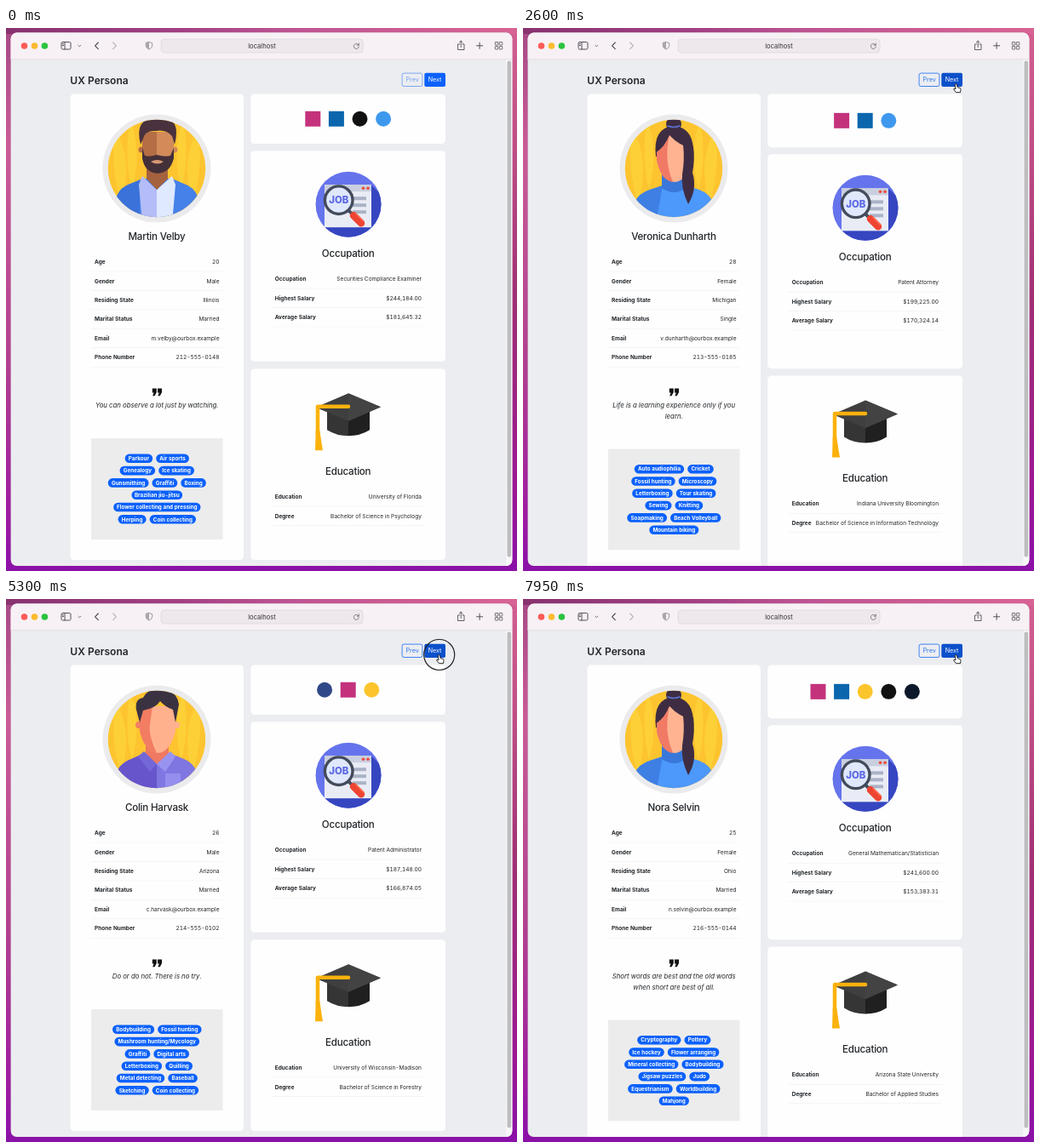
These frames come from a looping animation (600x638 px, 8 s). An HTML page:

```html
<!DOCTYPE html>
<html lang="en">
<head>
<meta charset="utf-8">
<title>UX Persona</title>
<style>
  html, body { margin: 0; width: 100%; height: 100%; overflow: hidden; }
  svg { display: block; width: 100vw; height: 100vh; }
  text { font-family: Inter, "Open Sans", sans-serif; font-variant-numeric: tabular-nums; white-space: pre; }
</style>
</head>
<body>
<svg viewBox="0 0 600 638">
  <defs>
    <linearGradient id="desk" x2="0" y2="1">
      <stop offset="0" stop-color="#a64a86"/>
      <stop offset=".22" stop-color="#c95c97"/>
      <stop offset=".6" stop-color="#b2428f"/>
      <stop offset=".9" stop-color="#9d1ca0"/>
      <stop offset="1" stop-color="#8a11a8"/>
    </linearGradient>
    <linearGradient id="side" x2="0" y2="1">
      <stop offset="0" stop-color="#d45f90"/>
      <stop offset=".25" stop-color="#bd4b84"/>
      <stop offset=".5" stop-color="#a02f74"/>
      <stop offset=".85" stop-color="#9c1793"/>
      <stop offset="1" stop-color="#8a11a8"/>
    </linearGradient>
    <linearGradient id="top">
      <stop offset="0" stop-color="#883270"/>
      <stop offset=".35" stop-color="#a34184"/>
      <stop offset=".55" stop-color="#bd5492"/>
      <stop offset="1" stop-color="#d86494"/>
    </linearGradient>
    <clipPath id="win"><rect x="5.6" y="5.6" width="588.8" height="626.4" rx="7"/></clipPath>
    <clipPath id="face"><circle cx="177" cy="165" r="57.2"/></clipPath>
    <clipPath id="disc"><circle cx="402" cy="63" r="38.5"/></clipPath>
  </defs>
  <rect width="600" height="638" fill="url(#desk)"/>
  <rect x="593" width="7" height="638" fill="url(#side)"/>
  <rect width="600" height="7" fill="url(#top)"/>
  <rect x="5.2" y="5.2" width="589.6" height="627.2" rx="7.4" fill="#7b2468" opacity=".25"/>
  <g clip-path="url(#win)">
    <rect x="5" y="5" width="590" height="628" fill="#ecedf1"/>
    <g id="page"></g>
    <g id="bar"></g>
  </g>
  <circle id="ring" cx="508.7" cy="65.5" r="18" fill="none" stroke="#222" stroke-width="1.2"/>
  <path id="hand" d="M507.2 66.2q1-1.2 2 0l1.1 3.5 2.9.9q1.1.5.8 1.8l-.6 3.3h-4.9l-2.9-3.7q.2-1.3 1.7-.7l.7.6z" fill="#fff" stroke="#111" stroke-width=".9" stroke-linejoin="round"/>
</svg>
<script>
const $ = id => document.getElementById(id);
const LOOP = 8000, INK = '#212529', BLUE = '#0b61fb';

const people = [
  { name: 'Martin Velby', info: ['20', 'Male', 'Illinois', 'Married', 'm.velby@ourbox.example', '212-555-0148'],
    face: 'beard', marks: 'pink navy black sky', height: 547.5,
    job: ['Securities Compliance Examiner', '$244,184.00', '$181,645.32'],
    study: ['University of Florida', 'Bachelor of Science in Psychology'],
    quote: ['You can observe a lot just by watching.'],
    tags: 'Parkour,Air sports|Genealogy,Ice skating|Gunsmithing,Graffiti,Boxing|Brazilian jiu-jitsu|Flower collecting and pressing|Herping,Coin collecting' },
  { name: 'Veronica Dunharth', info: ['28', 'Female', 'Michigan', 'Single', 'v.dunharth@ourbox.example', '213-555-0185'],
    face: 'woman', marks: 'pink navy sky', height: 560,
    job: ['Patent Attorney', '$199,225.00', '$170,324.14'],
    study: ['Indiana University Bloomington', 'Bachelor of Science in Information Technology'],
    quote: ['Life is a learning experience only if you', 'learn.'],
    tags: 'Auto audiophilia,Cricket|Fossil hunting,Microscopy|Letterboxing,Tour skating|Sewing,Knitting|Soapmaking,Beach Volleyball|Mountain biking' },
  { name: 'Colin Harvask', info: ['26', 'Male', 'Arizona', 'Married', 'c.harvask@ourbox.example', '214-555-0102'],
    face: 'man', marks: 'indigo pink gold', height: 547.5,
    job: ['Patent Administrator', '$187,148.00', '$166,874.05'],
    study: ['University of Wisconsin-Madison', 'Bachelor of Science in Forestry'],
    quote: ['Do or do not. There is no try.'],
    tags: 'Bodybuilding,Fossil hunting|Mushroom hunting/Mycology|Graffiti,Digital arts|Letterboxing,Quilling|Metal detecting,Baseball|Sketching,Coin collecting' },
  { name: 'Leopold Farnwick', info: ['27', 'Male', 'Connecticut', 'Single', 'l.farnwick@ourbox.example', '215-555-0146'],
    face: 'man', marks: 'indigo black', height: 536.5,
    job: ['Technical Systems Program Manager', '$199,548.00', '$153,384.09'],
    study: ['Clemson University', 'Bachelor of Mortuary Science'],
    quote: ['Courage is going from failure to failure', 'without losing enthusiasm.'],
    tags: 'Acting,Volleyball,Cabaret|Slacklining,Puzzles|Lockpicking,Geocaching|LARPing' },
  { name: 'Nora Selvin', info: ['25', 'Female', 'Ohio', 'Married', 'n.selvin@ourbox.example', '216-555-0144'],
    face: 'woman', marks: 'pink navy gold black ink', height: 560,
    job: ['General Mathematican/Statistician', '$241,600.00', '$153,383.31'],
    study: ['Arizona State University', 'Bachelor of Applied Studies'],
    quote: ['Short words are best and the old words', 'when short are best of all.'],
    tags: 'Cryptography,Pottery|Ice hockey,Flower arranging|Mineral collecting,Bodybuilding|Jigsaw puzzles,Judo|Equestrianism,Worldbuilding|Mahjong' }
];
// Pictures lag behind the text for a moment after the second switch
const lagging = { ...people[2], face: 'woman', marks: 'red black gold' };
const shows = [[0, people[0]], [1750, people[1]], [4050, lagging], [4250, people[2]], [5400, people[3]], [7700, people[4]]];
const clicks = [1550, 3850, 5200, 7500];

const rect = (x, y, w, h, fill, r = 0, more = '') =>
  `<rect x="${x}" y="${y}" width="${w}" height="${h}" rx="${r}" fill="${fill}" ${more}/>`;
const circle = (x, y, r, fill) => `<circle cx="${x}" cy="${y}" r="${r}" fill="${fill}"/>`;
const path = (d, fill) => `<path d="${d}" fill="${fill}"/>`;
const line = (d, color = '#55505a', w = 1) =>
  `<path d="${d}" fill="none" stroke="${color}" stroke-width="${w}" stroke-linecap="round" stroke-linejoin="round"/>`;
const move = (x, y, body) => `<g transform="translate(${x} ${y})">${body}</g>`;
// y is the middle of the capitals
const text = (x, y, s, size, { weight = 400, anchor = 'start', fill = INK, more = '' } = {}) =>
  `<text x="${x}" y="${y + size * .364}" font-size="${size}" font-weight="${weight}" text-anchor="${anchor}" fill="${fill}" ${more}>${s}</text>`;
const heading = (x, y, s) => text(x, y, s, 11.6, { weight: 500, anchor: 'middle', more: 'letter-spacing="-.23"' });

const pen = document.createElement('canvas').getContext('2d');
function badgeWidth(s) {
  pen.font = '700 63px Inter, "Open Sans", sans-serif';
  return pen.measureText(s).width / 10 + 8.4;
}

const table = (left, right, y, labels, values) => labels.map((label, i) => {
  const cy = y + i * 22.45;
  return text(left + 4, cy, label, 6.5, { weight: 700 }) +
    text(right - 4, cy, values[i], 6.55, { anchor: 'end' }) +
    rect(left, cy + 11, right - left, .6, '#f0f0f2');
}).join('');

const curtain = rect(113, 101, 128, 128, '#fdc42f') +
  path('M128 118Q150 155 135 206Q122 165 128 118zM146 108Q160 145 148 190Q138 150 146 108z', '#fdd037') +
  path('M226 118Q204 155 219 206Q232 165 226 118zM208 108Q194 145 206 190Q216 150 208 108z', '#fdd037');

const faces = {
  beard:
    path('M122 230L130 198Q134 187 146 183L160 177H195L209 183Q221 187 225 198L233 230z', '#4581e8') +
    path('M122 230L130 198Q134 187 146 183L157 179V230z', '#3b72da') +
    path('M160 174L177 190V230H160L156 184z', '#b4bdf8') + path('M195 174L177 190V230H195L199 184z', '#dfe9ff') +
    path('M165 160H190V177L177 190L165 177z', '#a5623e') +
    path('M160 122H197V151Q193 170 178 171Q163 170 160 151z', '#d28b59') +
    path('M160 122H177V171Q163 170 160 151z', '#b56d45') +
    circle(159, 143, 3.5, '#b56d45') + circle(198, 143, 3.5, '#d28b59') +
    path('M158 137Q154 121 159 113Q165 104 177 106Q192 103 198 113Q202 121 198 137L195 127Q188 119 176 121Q163 120 161 130z', '#49323d') +
    path('M160 141L163 150Q168 152 177 149Q187 152 193 150L197 141V153Q193 170 178 171Q163 170 160 153z', '#443039') +
    path('M170 157Q177 153 185 157Q178 162 170 157z', '#d99772'),
  man:
    path('M124 230L131 201Q136 192 147 188L163 181H192L209 188Q219 192 223 201L230 230z', '#8076e2') +
    path('M124 230L131 201Q136 192 147 188L163 181L177 195V230z', '#6655cb') +
    rect(187, 205, 18, 25, '#948eee', 1) +
    path('M164 164H191V182L177 194L164 182z', '#ef7961') +
    path('M162 179L177 194L169 203L155 185z', '#7467d8') + path('M193 179L177 194L187 203L199 185z', '#9993f0') +
    path('M157 126H199V155Q193 180 178 181Q162 178 157 155z', '#ffb18d') +
    path('M157 126H172L169 147Q167 160 177 181Q162 178 157 155z', '#f27d63') +
    circle(156, 148, 4, '#f27d63') + circle(200, 148, 4, '#ffb18d') +
    path('M157 145L153 130Q151 117 161 116Q168 103 184 106Q201 108 203 124L199 145L196 130Q187 127 181 120Q176 128 161 131z', '#3b3241'),
  woman:
    path('M127 230L131 205Q136 194 149 190L164 185H191L207 190Q220 195 223 206L229 230z', '#4d98fb') +
    path('M127 230L131 205Q136 194 149 190L164 185L156 230z', '#3e7fe4') +
    circle(177, 113, 9, '#3e2d42') +
    path('M156 151Q152 117 177 115Q202 117 200 151z', '#3e2d42') +
    path('M163 164H191V188Q178 198 163 188z', '#3978d9') +
    path('M164 164H190V174Q178 183 164 174z', '#ef755f') +
    path('M157 146Q167 139 172 126Q183 138 199 142V156Q192 180 178 181Q162 179 157 156z', '#ffb391') +
    path('M157 146Q167 139 172 126Q165 155 176 181Q162 179 157 156z', '#f17a64') +
    path('M188 137L200 139Q202 155 199 170Q205 189 194 207Q185 188 187 172Q190 155 188 137z', '#3e2d42') +
    line('M170 115Q177 118 184 115', '#5d73d7', 1.5)
};
const avatar = kind => circle(177, 165, 63.5, '#ebebed') +
  `<g clip-path="url(#face)">${curtain + faces[kind]}</g>`;

// Plain stand-ins: [colour, square?]
const marks = {
  pink: ['#c4327c', 1], navy: ['#0b66ad', 1], black: ['#111'], sky: ['#3e98ee'],
  red: ['#c5202b'], gold: ['#fcc52c'], indigo: ['#2f4888'], ink: ['#0c1829']
};
const markRow = (names, y) => names.split(' ').map((n, i, all) => {
  const x = 401.7 + (i - (all.length - 1) / 2) * 27.6, [color, square] = marks[n];
  return square ? rect(x - 9, y - 9, 18, 18, color) : circle(x, y, 9, color);
}).join('');

const jobIcon = `<g clip-path="url(#disc)">` + circle(402, 63, 39, '#6574ec') +
  path('M429 40L445 56V105H390L374 90z', '#3646c0') + '</g>' +
  rect(374, 40, 55, 50, '#e9ecf5') + rect(374, 40, 55, 8, '#c9cfde') +
  circle(419.5, 44, 1.8, '#ee4b3b') + circle(425, 44, 1.8, '#ee4b3b') +
  [54, 62, 70].map(y => rect(407, y, 16, 4, '#aab3c6')).join('') +
  line('M403 71L408 76', '#465062', 4) + line('M408 76L417 85', '#ef4432', 8.5) +
  line('M411 74L420 83', '#ff6b50', 1.5) +
  circle(390.7, 58, 18, '#434b5b') + circle(390.7, 58, 14.6, '#dfe8fc') +
  text(390.9, 58, 'JOB', 11.4, { weight: 800, anchor: 'middle', fill: '#5b68e2' });

const capIcon = path('M377 48V72Q388 79 402 79V48z', '#353535') +
  path('M427 48V72Q416 79 402 79V48z', '#202020') +
  path('M363.5 45.500L402 29L440 45L402 61.5z', '#3f3f3f') + path('M402 29L440 45L402 61.5z', '#434343') +
  line('M402 44.5H366V76', '#fbb20d', 4.5) +
  path('M363.7 72H368.3L370.5 87L372 96H363z', '#fbb20d');

const quoteMark = x => path(`M${x} 423.5h5v4.6l-2.2 4.1h-2.5l1.5-3.7h-1.8z`, '#111');

function tagBox(rows, y) {
  const body = rows.map((row, i) => {
    const items = row.split(','), widths = items.map(badgeWidth);
    let x = 177.3 - (widths.reduce((a, b) => a + b) + 4 * (items.length - 1)) / 2;
    const cy = y + 23.6 + i * 14.3;
    return items.map((item, k) => {
      const w = widths[k], left = x;
      x += w + 4;
      return rect(left, cy - 5.3, w, 10.6, BLUE, 5.3) +
        text(left + w / 2, cy, item, 6.3, { weight: 700, anchor: 'middle', fill: '#fff' });
    }).join('');
  }).join('');
  return rect(100, y, 154.5, 47.2 + 14.3 * (rows.length - 1), '#ececec') + body;
}

function page(p, hover) {
  const grow = (p.height - 547.5) / 3, top = 77.5;
  const jobTop = 144.2 + grow, studyTop = 400.2 + 2 * grow, bottom = top + p.height;
  const scrolls = p.height > 540, first = p === people[0];
  const card = (x, y, w, end) => rect(x, y, w, end - y, '#fefefe', 4.5);
  const body =
    text(75.3, 61.5, 'UX Persona', 12, { weight: 600 }) +
    `<g opacity="${first ? .65 : 1}">` + rect(465.1, 53.1, 23.8, 15.4, 'none', 2, 'stroke="#2d78f3" stroke-width=".9"') +
    text(477.1, 60.8, 'Prev', 7.2, { anchor: 'middle', fill: '#2d78f3' }) + '</g>' +
    rect(491.3, 52.7, 24.7, 16.2, hover ? '#0b50cb' : BLUE, 2) +
    text(503.6, 60.8, 'Next', 7.1, { anchor: 'middle', fill: '#fff' }) +
    card(75.5, top, 203.5, bottom) + card(287.3, top, 228.7, 136 + grow) +
    card(287.3, jobTop, 228.7, 391.8 + 2 * grow) + card(287.3, studyTop, 228.7, bottom) +
    avatar(p.face) + heading(177, 244.5, p.name) +
    table(100, 254.5, 274.7, ['Age', 'Gender', 'Residing State', 'Marital Status', 'Email', 'Phone Number'], p.info) +
    quoteMark(171.8) + quoteMark(178) +
    p.quote.map((s, i) => text(177.2, 443.3 + i * 12.4, s, 7.8, { anchor: 'middle', more: 'font-style="italic"' })).join('') +
    tagBox(p.tags.split('|'), 469.8 + p.quote.length * 12.4) +
    markRow(p.marks, (top + 136 + grow) / 2) +
    move(0, jobTop, jobIcon + heading(401.7, 120.5, 'Occupation') +
      table(311.7, 492, 150.6, ['Occupation', 'Highest Salary', 'Average Salary'], p.job)) +
    move(0, studyTop, capIcon + heading(401.7, 120.4, 'Education') +
      table(311.7, 492, 150.5, ['Education', 'Degree'], p.study));
  const scrollbar = rect(587.3, 37, 8, 596, '#f7f7f8') + rect(588.5, 38.5, 4.6, 583, '#bdbdc0', 2.3);
  return move(scrolls ? 0 : 4.6, scrolls ? 0 : 1.4, body) + (scrolls ? scrollbar : '');
}

$('bar').innerHTML = rect(5, 5, 590, 32, '#f7f1f5') + rect(5, 36.5, 590, .7, '#d9d3d8') +
  circle(21.5, 21, 3.8, '#fc5b57') + circle(33.5, 21, 3.8, '#fcbb2f') + circle(45.4, 21, 3.8, '#2ac440') +
  line('M66.5 16.5H74.5Q76 16.5 76 18V23.5Q76 25 74.5 25H66.5Q65 25 65 23.5V18Q65 16.5 66.5 16.5zM69 16.5V25M66.3 18.7H67.5M66.3 20.5H67.5') +
  line('M84.8 20.3L86.3 21.7L87.8 20.3', '#66616a', .9) +
  line('M108.3 17L104.6 20.8L108.3 24.6', '#4b464f', 1.1) +
  line('M125.7 17L129.4 20.8L125.7 24.6', '#b8b2b8', 1.1) +
  line('M168 16.5L171.7 17.7V21Q171.5 23.5 168 25.2Q164.5 23.5 164.3 21V17.7z', '#958f96', .9) +
  path('M168 16.5V25.2Q164.5 23.5 164.3 21V17.7z', '#aaa4ab') +
  rect(182, 13, 237, 16, '#eee8ec', 4, 'stroke="#ddd6db" stroke-width=".8"') +
  text(300.5, 21.2, 'localhost', 7.6, { anchor: 'middle', fill: '#38343b' }) +
  line('M414 20A3 3 0 1 0 414.3 22M414.3 18V20.2H412.2', '#6b666e', .8) +
  line('M532.5 19H530.5V25.5H538V19H536M534.2 22.5V15.2M532.3 17L534.2 15.2L536.1 17', '#55505a', .9) +
  line('M552.5 20.8H559.7M556.1 17.2V24.4') +
  [574.3, 579.3].map(x => [16.5, 21.5].map(y =>
    rect(x, y, 3.5, 3.5, 'none', .5, 'stroke="#55505a" stroke-width=".8"')).join('')).join('');

const ease = u => u * u * (3 - 2 * u);
let shown = '';

function draw(t) {
  const index = shows.findLastIndex(([at]) => at <= t);
  const hover = t >= 1060, key = index + '/' + hover;
  if (key !== shown) {
    $('page').innerHTML = page(shows[index][1], hover);
    shown = key;
  }
  const away = 1 - ease(Math.min(1, Math.max(0, (t - 550) / 600)));
  $('hand').setAttribute('transform', `translate(${away * 60} ${away * 590})`);
  $('hand').setAttribute('visibility', t < 550 ? 'hidden' : 'visible');
  $('ring').setAttribute('visibility', clicks.some(c => t >= c && t < c + 200) ? 'visible' : 'hidden');
}

const start = performance.now();
(function tick() {
  draw((performance.now() - start) % LOOP);
  requestAnimationFrame(tick);
})();
</script>
</body>
</html>
```
